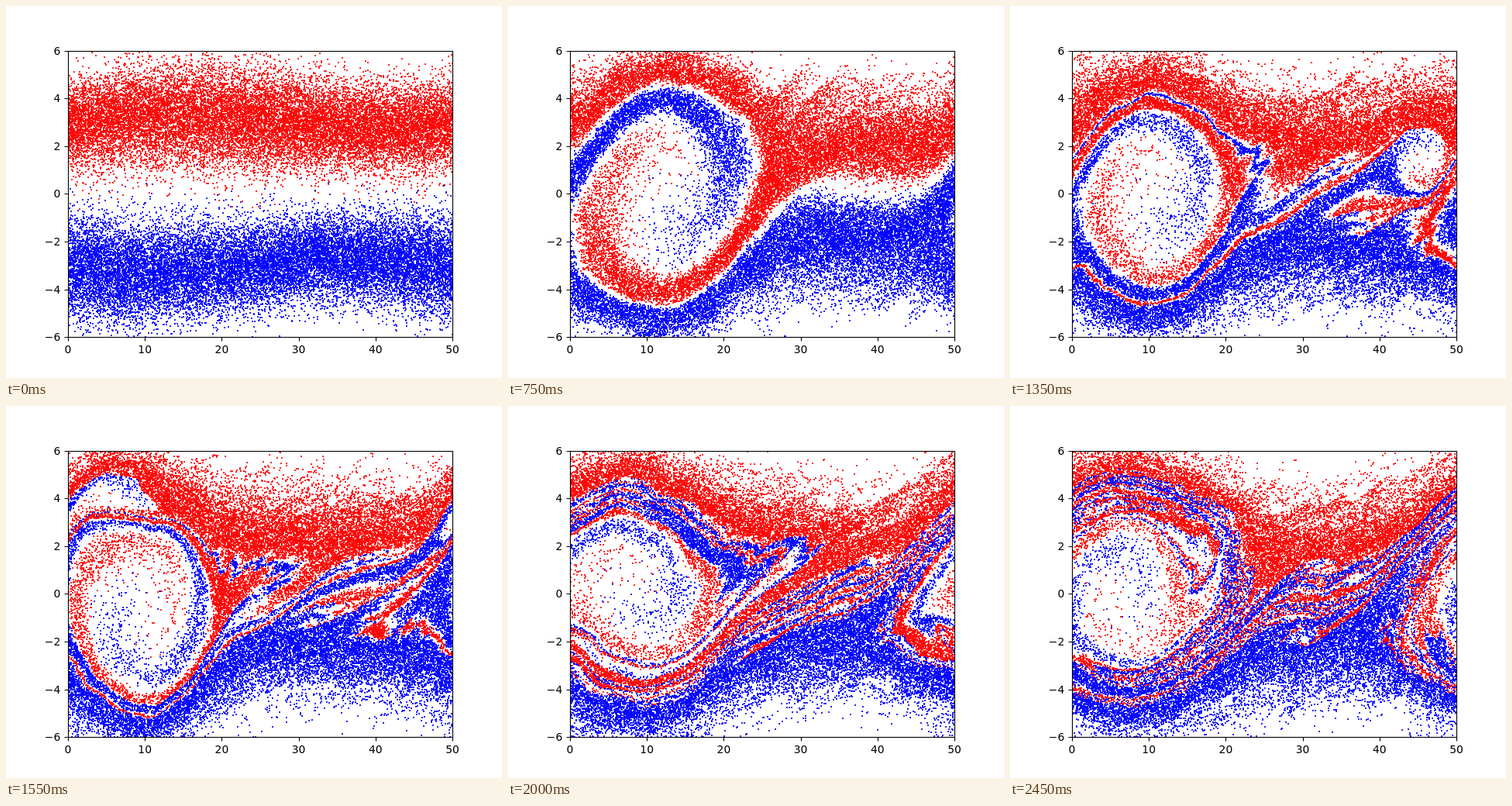
An HTML page with a canvas that plays this animation: 640 by 480 pixels, repeating every 2.5 s.

```html
<!DOCTYPE html>
<html lang="en">
<head>
<meta charset="utf-8">
<title>Two-stream instability</title>
<style>
html, body { margin: 0; width: 100%; height: 100%; overflow: hidden; background: #fff; }
canvas { display: block; }
</style>
</head>
<body>
<canvas id="stage" width="640" height="480"></canvas>
<script>
const COUNT = 40000, HALF = COUNT / 2, CELLS = 400, BOX = 50, DX = BOX / CELLS;
const FRAMES = 50, FRAME_MS = 50;
const LEFT = 80, TOP = 58, RIGHT = 576, BOTTOM = 427;
const WIDTH = RIGHT - LEFT + 1, HEIGHT = BOTTOM - TOP + 1;
const COVERAGE = 0.85;

const toX = x => 80 + x * 9.92;
const toY = v => 427.2 - (v + 6) * 30.8;
const ctx = document.getElementById('stage').getContext('2d');

// Mersenne Twister with 53-bit uniforms and polar Gaussian pairs
function makeRandom(seed) {
  const state = new Uint32Array(624);
  let index = 624, spare = null;
  state[0] = seed;
  for (let i = 1; i < 624; i++) {
    const s = state[i - 1] ^ (state[i - 1] >>> 30);
    state[i] = Math.imul(1812433253, s) + i;
  }
  function next() {
    if (index === 624) {
      for (let i = 0; i < 624; i++) {
        const y = (state[i] & 0x80000000) | (state[(i + 1) % 624] & 0x7fffffff);
        state[i] = state[(i + 397) % 624] ^ (y >>> 1) ^ (y & 1 ? 0x9908b0df : 0);
      }
      index = 0;
    }
    let y = state[index++];
    y ^= y >>> 11;
    y ^= (y << 7) & 0x9d2c5680;
    y ^= (y << 15) & 0xefc60000;
    return (y ^ (y >>> 18)) >>> 0;
  }
  function uniform() {
    const high = next() >>> 5, low = next() >>> 6;
    return (high * 67108864 + low) / 9007199254740992;
  }
  function gauss() {
    if (spare !== null) {
      const value = spare;
      spare = null;
      return value;
    }
    let a, b, r;
    do {
      a = 2 * uniform() - 1;
      b = 2 * uniform() - 1;
      r = a * a + b * b;
    } while (r >= 1 || r === 0);
    const f = Math.sqrt(-2 * Math.log(r) / r);
    spare = f * a;
    return f * b;
  }
  return { uniform, gauss };
}

const pos = new Float64Array(COUNT), vel = new Float64Array(COUNT);
const acc = new Float64Array(COUNT);
const density = new Float64Array(CELLS), flux = new Float64Array(CELLS);
const field = new Float64Array(CELLS);

function initBeams() {
  const random = makeRandom(42);
  for (let i = 0; i < COUNT; i++) pos[i] = random.uniform() * BOX;
  for (let i = 0; i < COUNT; i++) {
    const v = random.gauss() + 3;
    vel[i] = (i < HALF ? v : -v) * (1 + 0.1 * Math.sin(2 * Math.PI * pos[i] / BOX));
  }
}

// Cloud-in-cell density, periodic Poisson solve, interpolated force
function updateForce() {
  density.fill(0);
  for (let i = 0; i < COUNT; i++) {
    const q = pos[i] / DX, j = Math.floor(q), w = q - j;
    density[j % CELLS] += 1 - w;
    density[(j + 1) % CELLS] += w;
  }
  let sum = 0, total = 0;
  for (let j = 0; j < CELLS; j++) {
    sum += (density[j] * CELLS / COUNT - 1) * DX;
    flux[j] = sum;
    total += sum;
  }
  const mean = total / CELLS;
  for (let j = 0; j < CELLS; j++) {
    field[j] = (flux[j] + flux[(j + CELLS - 1) % CELLS]) / 2 - mean;
  }
  for (let i = 0; i < COUNT; i++) {
    const q = pos[i] / DX, j = Math.floor(q), w = q - j;
    acc[i] = (1 - w) * field[j % CELLS] + w * field[(j + 1) % CELLS];
  }
}

function step() {
  for (let i = 0; i < COUNT; i++) {
    vel[i] += acc[i] / 2;
    const p = (pos[i] + vel[i]) % BOX;
    pos[i] = p < 0 ? p + BOX : p;
  }
  updateForce();
  for (let i = 0; i < COUNT; i++) vel[i] += acc[i] / 2;
}

function snapshot() {
  const dots = new Int16Array(COUNT * 2);
  for (let i = 0; i < COUNT; i++) {
    dots[2 * i] = Math.floor(toX(pos[i]) + 0.5) - LEFT;
    dots[2 * i + 1] = Math.floor(toY(vel[i]) + 0.5) - TOP;
  }
  return dots;
}

const image = ctx.createImageData(WIDTH, HEIGHT);

function blend(x, y, red, blue) {
  if (x < 0 || y < 0 || x >= WIDTH || y >= HEIGHT) return;
  const data = image.data, k = (y * WIDTH + x) * 4;
  data[k] += (red - data[k]) * COVERAGE;
  data[k + 1] *= 1 - COVERAGE;
  data[k + 2] += (blue - data[k + 2]) * COVERAGE;
}

function drawDots(dots) {
  image.data.fill(255);
  for (let i = 0; i < COUNT; i++) {
    const x = dots[2 * i], y = dots[2 * i + 1];
    const red = i < HALF ? 255 : 0, blue = 255 - red;
    blend(x - 1, y - 1, red, blue);
    blend(x, y - 1, red, blue);
    blend(x - 1, y, red, blue);
    blend(x, y, red, blue);
  }
  ctx.putImageData(image, LEFT, TOP);
}

function drawAxes() {
  ctx.strokeStyle = ctx.fillStyle = '#000';
  ctx.lineWidth = 1.11;
  ctx.strokeRect(LEFT + 0.5, TOP + 0.5, WIDTH - 1, HEIGHT - 1);
  ctx.font = '13.889px "DejaVu Sans", sans-serif';
  ctx.beginPath();
  ctx.textAlign = 'center';
  for (let value = 0; value <= 50; value += 10) {
    const x = Math.round(toX(value)) + 0.5;
    ctx.moveTo(x, BOTTOM + 0.5);
    ctx.lineTo(x, BOTTOM + 5.5);
    ctx.fillText(value, toX(value), 448);
  }
  ctx.textAlign = 'right';
  for (let value = -6; value <= 6; value += 2) {
    const y = Math.round(toY(value)) + 0.5;
    ctx.moveTo(LEFT + 0.5, y);
    ctx.lineTo(LEFT - 4.5, y);
    ctx.fillText(String(value).replace('-', '\u2212'), 70.3, Math.round(toY(value) + 5.1));
  }
  ctx.stroke();
}

initBeams();
updateForce();
const snapshots = Array.from({ length: FRAMES }, () => {
  step();
  return snapshot();
});

let shown = -1;
function render(time) {
  const frame = Math.floor(time / FRAME_MS) % FRAMES;
  if (frame !== shown) {
    shown = frame;
    ctx.fillStyle = '#fff';
    ctx.fillRect(0, 0, 640, 480);
    drawDots(snapshots[frame]);
    drawAxes();
  }
  requestAnimationFrame(render);
}
render(0);
</script>
</body>
</html>
```
